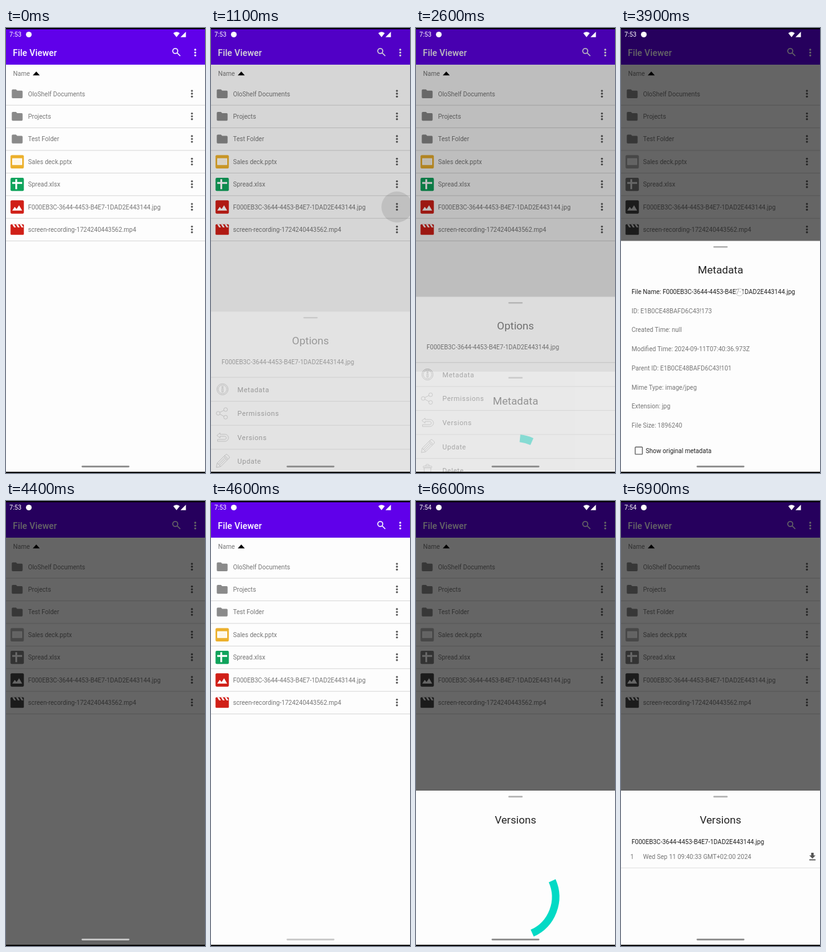
These frames come from a looping animation (320x716 px, 8 s). An HTML page:

```html
<!DOCTYPE html>
<html lang="en">
<head>
<meta charset="utf-8">
<title>File Viewer</title>
<style>
  html, body { margin: 0; width: 100%; height: 100%; overflow: hidden; background: #000; }
  svg { display: block; width: 100vw; height: 100vh; font-family: Roboto, Arial, sans-serif; }
  text { white-space: pre; }
</style>
</head>
<body>
<svg id="stage" viewBox="0 0 320 716"></svg>
<script>
const LOOP = 8000, STEP = 100;
const TEXT = 10.06, SLIDE = 143, DIM = 0.6;
const FILE = 'F000EB3C-3644-4453-B4E7-1DAD2E443144.jpg';
const GREY = '#777', DARK = '#222';

// ---- helpers
const ramp = (t, start, length) => Math.min(1, Math.max(0, (t - start) / length));
const lerp = (a, b, p) => a + (b - a) * p;
const at = (x, y, body, extra = '') => `<g transform="translate(${x} ${y})" ${extra}>${body}</g>`;
const rect = (x, y, w, h, fill, extra = '') =>
  `<rect x="${x}" y="${y}" width="${w}" height="${h}" fill="${fill}" ${extra}/>`;
const circle = (x, y, r, extra) => `<circle cx="${x}" cy="${y}" r="${r}" ${extra}/>`;
const path = (d, fill, extra = '') => `<path d="${d}" fill="${fill}" ${extra}/>`;
const text = (x, y, s, fill = GREY, size = TEXT, extra = '') =>
  `<text x="${x}" y="${y}" fill="${fill}" font-size="${size}" ${extra}>${s}</text>`;
const dots = (x, y, fill) =>
  [-4.6, 0, 4.6].map(d => circle(x, y + d, 1.6, `fill="${fill}"`)).join('');
const line = (y, color) => rect(0, y - 0.5, 320, 1, color);

// ---- file list; icons are centred on 0,0
const tile = (color, body) => rect(-10.7, -10.4, 21.4, 21.4, color, 'rx="2"') + body;
const folder = path('M-7-7H-2L0-5H7.2Q8.7-5 8.7-3.3V5.5Q8.7 7.2 7.2 7.2H-7.2Q-8.7 7.2-8.7 5.5V-5.3Q-8.7-7-7-7Z', '#8a8a8a');
const icons = {
  folder,
  deck: tile('#ecb02c', rect(-8, -5.3, 16, 10.8, '#fff') + rect(-6.7, -4, 13.4, 8.2, '#fff8e8')),
  sheet: tile('#10a35c', rect(-8, -3.5, 16, 3, '#fff') + rect(-3, -8, 3, 16, '#fff')),
  image: tile('#d01f17', path('M-8 6L-4 0L-1 3.5L3-2.5L8 6Z', '#fff')),
  video: rect(-10.7, -8.3, 21.4, 17, '#d01f17', 'rx="1.5"') +
    [-8, -2, 4].map(x => path(`M${x}-8.3h3l3 5h-3Z`, '#fff')).join('')
};
const files = [
  ['folder', 'OloShelf Documents'],
  ['folder', 'Projects'],
  ['folder', 'Test Folder'],
  ['deck', 'Sales deck.pptx'],
  ['sheet', 'Spread.xlsx'],
  ['image', FILE],
  ['video', 'screen-recording-1724240443562.mp4']
];

function fileList(dim) {
  const filter = dim > 0.55 ? 'style="filter:grayscale(1)"' : '';
  return rect(0, 0, 320, 716, '#fdfdfd') + rect(0, 0, 320, 59, '#6000ea') +
    text(11, 44.8, 'File Viewer', '#fff', 14.2, 'font-weight="500" letter-spacing=".1"') +
    `<g fill="none" stroke="#fff" stroke-width="1.6">${circle(272.2, 37, 4, '')}<path d="M275.2 40L280.2 45"/></g>` +
    dots(304.3, 39.5, '#fff') +
    text(11.5, 77.2, 'Name') + path('M43 76.3L48.7 70L54.3 76.3Z', '#000') +
    files.map(([kind, name], i) => {
      const y = 106 + 36.4 * i;
      return at(18, y - 0.3, icons[kind], filter) + text(35.5, y + 3.6, name) +
        dots(299, y - 0.3, '#555') + line(y + 18.2, '#d8d8d8');
    }).join('');
}

// ---- bottom sheets, drawn from their own top edge
const bin = (stroke, fill) => `<g stroke="${stroke}" fill="${fill}">
  <path d="M-5.5-4.5H5.5L5 7.5Q4.8 9.5 3 9.5H-3Q-4.8 9.5-5 7.5Z"/>
  <rect x="-7" y="-7" width="14" height="2.8" rx="1.3"/><path d="M-2.5-7V-8.5Q-2.5-9.8-1.2-9.8H1.2Q2.5-9.8 2.5-8.5V-7"/></g>`;
const actions = [
  ['Metadata', circle(0, 0, 9, '') + circle(0, 0, 7, '') + '<path d="M-1-1.5H1V4.5H-1ZM-1-4.5H1V-3H-1Z"/>'],
  ['Permissions', '<path d="M-4.5-1.5L2.5-4.8M-4.5 1.2L2.5 5"/>' +
    circle(-7, 0, 3, '') + circle(5, -6, 3, '') + circle(5, 6.3, 3, '')],
  ['Versions', '<path d="M-9-3L-4-7V-4.8H4A5.6 5.6 0 0 1 4 6.5H-8V3.5H4A2.6 2.6 0 0 0 4-1.6H-4V1Z"/>'],
  ['Update', '<g transform="rotate(-45)"><path d="M-14 0L-8-4H11Q13-4 13-2V2Q13 4 11 4H-8ZM-8-4V4M7-4V4M9-4V4M-8-1.3H7M-8 1.3H7"/></g>'],
  ['Delete', bin('#888', 'none')],
  ['Permanently delete', bin('#ff5a45', '#ff7a60')]
];
const fields = [
  'File Name: ' + FILE, 'ID: E1B0CE48BAFD6C43!173', 'Created Time: null',
  'Modified Time: 2024-09-11T07:40:36.973Z', 'Parent ID: E1B0CE48BAFD6C43!101',
  'Mime Type: image/jpeg', 'Extension: jpg', 'File Size: 1896240'
];

const optionsBody = text(17, 84.5, FILE, DARK) + actions.map(([name, icon], i) => {
  const y = 125 + 38.6 * i;
  return line(y - 19.3, '#c4c4c4') +
    at(18.5, y, icon, 'fill="none" stroke="#888" stroke-width=".9"') +
    text(42.5, y + 4.2, name, i === 5 ? '#d80000' : DARK, 11, 'letter-spacing=".55"');
}).join('');

const metadataBody =
  fields.map((s, i) => text(17, 85.5 + 30.7 * i, s, i ? GREY : DARK)).join('') +
  rect(22.8, 331.8, 11.6, 11.6, 'none', 'stroke="#666" stroke-width="1.4" rx="1"') +
  text(39.8, 341.2, 'Show original metadata', DARK);

const versionsBody = text(17, 85.5, FILE, DARK) + text(15, 110.3, '1') +
  text(35.5, 110.3, 'Wed Sep 11 09:40:33 GMT+02:00 2024') +
  path('M305.8 100H309.8V104.3H312.8L307.8 109.3L302.8 104.3H305.8ZM302.8 110.6H312.8V112.2H302.8Z', '#555') +
  line(124.3, '#e0e0e0');

// a large ring whose arc starts near the top and grows clockwise
function spinner(age) {
  const run = Math.max(0, age - 100);
  return circle(160.5, 171, 64, `fill="none" stroke="#03dac5" stroke-width="12"
    stroke-dasharray="${20 + run * 0.4} 500" transform="rotate(${run * 0.3 - 84} 160.5 171)"`);
}

const sheet = (top, alpha, title, body) => alpha <= 0 ? '' :
  at(0, top, rect(0, 0, 320, 800, '#fdfdfd') +
    rect(148.5, 8.6, 23, 2.4, '#b0b0b0', 'rx="1"') +
    text(160, 52.6, title, DARK, 17.15, 'text-anchor="middle"') + body, `opacity="${alpha}"`);

// Options slides in after a press on the row menu and leaves when an action is picked.
function options(t, press, leave) {
  const enter = ramp(t, press + 100, 300), exit = ramp(t, leave, 200);
  const alpha = enter * (1 - exit);
  return { alpha, svg: sheet(361 + SLIDE * (1 - alpha), alpha, 'Options', optionsBody) };
}

// A detail sheet slides in with a spinner, then shows its content.
function detail(t, start, loaded, title, body, fullTop) {
  const alpha = ramp(t, start, 255), ready = t >= loaded;
  const top = ready ? fullTop : 466 + SLIDE * (1 - alpha);
  return { alpha, svg: shift => sheet(top + shift, alpha, title, ready ? body : spinner(t - start)) };
}

function ripple(t, press) {
  const age = t - press;
  if (age < 0 || age >= 800) return '';
  const r = lerp(10, 25, ramp(age, 0, 200));
  return circle(299, 288, r, `fill="#000" opacity="${0.1 * (1 - ramp(age, 500, 300))}"`);
}

const touch = (x, y) => circle(x, y, 6, 'fill="#fff" fill-opacity=".6" stroke="#bbb" stroke-width=".8"');
const taps = [[900, 299, 288], [2400, 100, 487], [5100, 299, 288], [6200, 100, 563]];

function statusBar(t) {
  const bar = t >= 4400 && t < 5900 ? '#c8c8c8' : '#8c8c8c';
  return text(5.5, 14.2, t < 4800 ? '7:53' : '7:54', '#fff') +
    circle(36.7, 10.5, 4.6, 'fill="#fff"') +
    path('M269 8.2Q274.2 4.2 279.4 8.2L274.2 14.8Z', '#fff') +
    path('M280.6 14.8H289.3V6Z', '#fff') +
    rect(121.5, 704.2, 77, 2.8, bar, 'rx="1.4"') +
    rect(0, 0, 320, 2, '#000') + rect(0, 714, 320, 2, '#000');
}

function draw(t) {
  const first = options(t, 900, 2500), second = options(t, 5100, 6300);
  const meta = detail(t, 2500, 2800, 'Metadata', metadataBody, 342.5);
  const versions = detail(t, 6300, 6800, 'Versions', versionsBody, 466);

  // the metadata sheet is pulled down, let go, then the dim clears
  const pull = 120 * ramp(t, 3900, 300) ** 2;
  const shift = pull + 260 * ramp(t, 4200, 200);
  const metaDim = meta.alpha * (1 - ramp(t, 4400, 200));
  const dim = DIM * Math.max(first.alpha, second.alpha, metaDim, versions.alpha) ** 1.25;

  const tap = taps.find(([time]) => t >= time && t < time + STEP);
  const finger = tap ? touch(tap[1], tap[2]) :
    t >= 3900 && t < 4300 ? touch(190.5, 425 + pull) : '';

  return fileList(dim) + ripple(t, 900) + ripple(t, 5100) +
    rect(0, 0, 320, 716, '#000', `opacity="${dim}"`) +
    first.svg + second.svg + (t < 4400 ? meta.svg(shift) : '') + versions.svg(0) +
    finger + statusBar(t);
}

const stage = document.getElementById('stage');
const origin = performance.now();
let shown = -1;
function frame() {
  const step = Math.floor((performance.now() - origin) % LOOP / STEP);
  if (step !== shown) {
    shown = step;
    stage.innerHTML = draw(step * STEP);
  }
  requestAnimationFrame(frame);
}
frame();
</script>
</body>
</html>
```
